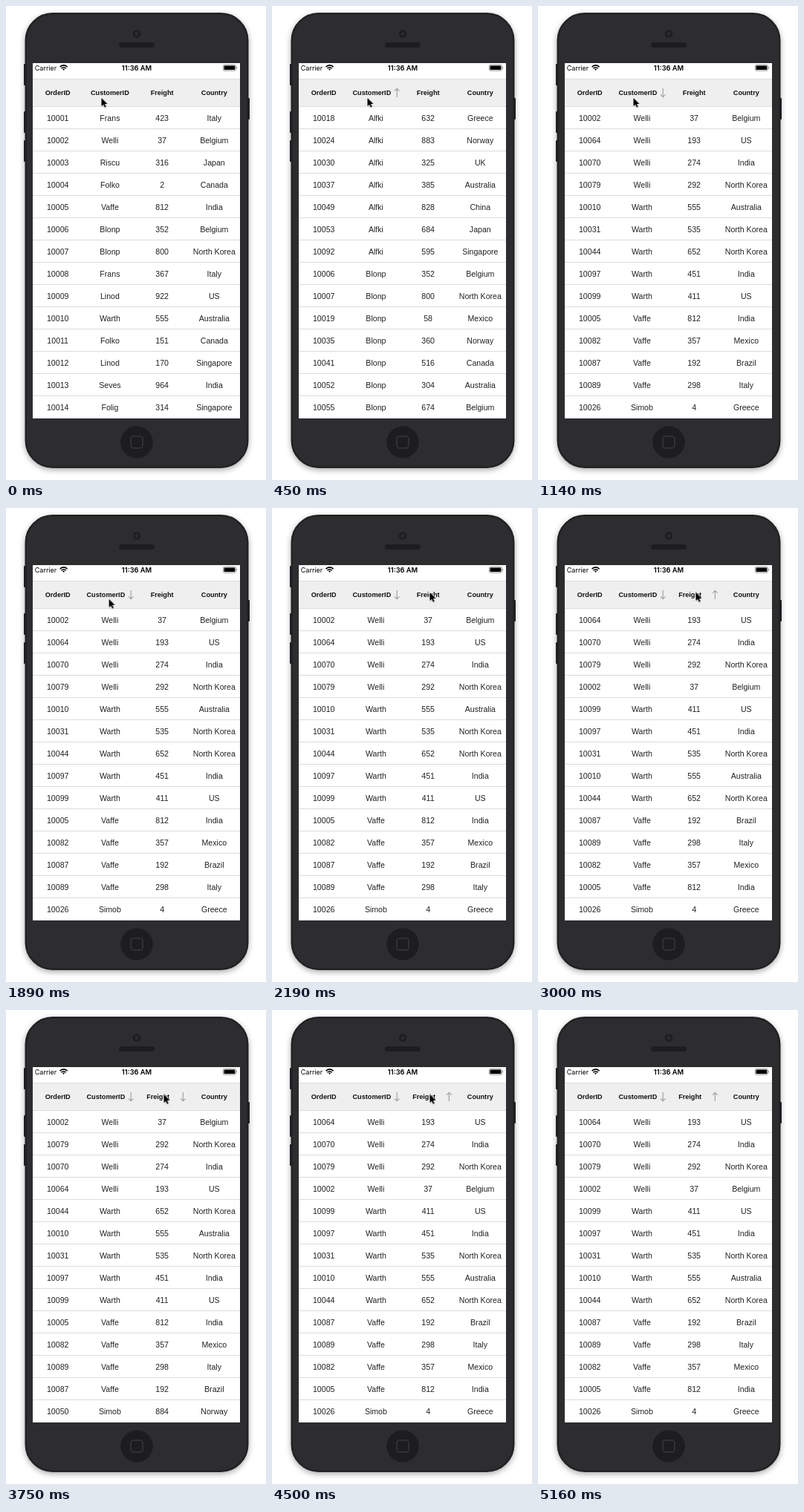
Animation, 350 px wide and 639 px high, one loop 5.46 s. Source, as an HTML page:

```html
<!DOCTYPE html>
<html lang="en">
<head>
<meta charset="utf-8">
<title>Sortable grid on a phone</title>
<style>
  html, body { margin: 0; width: 100%; height: 100%; overflow: hidden; background: #fff; }
  svg { position: absolute; left: 0; top: 0; display: block; }
  text { font-family: "Liberation Sans", Arial, sans-serif; text-anchor: middle; }
  .cell { font-size: 10.6px; fill: #222; }
  .head { font-size: 9.15px; font-weight: 700; fill: #111; }
  .status { font-family: Inter, Roboto, sans-serif; font-size: 9px; fill: #000; }
  .time { font-size: 9.3px; font-weight: 600; }
  .rule { stroke: #dcdcdc; stroke-width: 1; }
  .arrow { fill: none; stroke: #a2a2a2; stroke-width: 1.2; }

  #strip { animation: sort 5460ms step-end infinite; }
  #cursor { animation: point 5460ms step-end infinite; }

  /* The views lie side by side, 300px apart. */
  @keyframes sort {
    0%      { transform: translateX(0); }
    8.241%  { transform: translateX(-300px); }
    20.879% { transform: translateX(-600px); }
    54.945% { transform: translateX(-900px); }
    68.681% { transform: translateX(-1200px); }
    82.417%, 100% { transform: translateX(-900px); }
  }
  @keyframes point {
    0%      { transform: translate(128.5px, 124px); }
    33.516% { transform: translate(128.5px, 124px); animation-timing-function: steps(3, jump-start); }
    35.3%   { transform: translate(143.6px, 122.2px); animation-timing-function: steps(6, jump-start); }
    38.9%   { transform: translate(197.4px, 115.8px); animation-timing-function: steps(3, jump-start); }
    40.7%   { transform: translate(212.5px, 114px); }
    90.109% { transform: translate(210.5px, 114.5px); }
    92.857% { transform: translate(210.5px, 114.5px); visibility: visible; animation-timing-function: steps(3, jump-start); }
    94.505%, 100% { transform: translate(301px, 86.5px); visibility: hidden; }
  }
</style>
</head>
<body>
<svg width="350" height="639" viewBox="0 0 350 639">
  <defs>
    <clipPath id="screen"><rect x="36" y="77" width="279" height="479"/></clipPath>
    <filter id="soft" x="-10%" y="-10%" width="120%" height="120%"><feGaussianBlur stdDeviation="4"/></filter>
    <filter id="faint" x="-50%" y="-50%" width="200%" height="200%"><feGaussianBlur stdDeviation=".8"/></filter>
  </defs>

  <rect x="26" y="12" width="300" height="613" rx="37" fill="#000" opacity=".38" filter="url(#soft)"/>
  <g fill="#1d1d20">
    <rect x="24" y="78" width="4" height="29" rx="1"/>
    <rect x="24" y="142" width="4" height="29" rx="1"/>
    <rect x="24" y="181" width="4" height="29" rx="1"/>
    <rect x="324" y="124" width="4" height="29" rx="1"/>
  </g>
  <rect x="26.75" y="10.25" width="298.5" height="611.5" rx="36" fill="#2d2d30" stroke="#222225" stroke-width="2.5"/>
  <circle cx="176" cy="37.5" r="5.2" fill="#1d1d20"/>
  <circle cx="176" cy="37.5" r="2.7" fill="#2a2a2d"/>
  <rect x="152" y="49" width="48" height="7" rx="3.5" fill="#1d1d20"/>
  <circle cx="176" cy="588" r="21.7" fill="#1d1d20"/>
  <rect x="168" y="580" width="16" height="16" rx="4" fill="none" stroke="#37373a" stroke-width="1.6"/>

  <g clip-path="url(#screen)">
    <rect x="36" y="77" width="279" height="479" fill="#fff"/>
    <rect x="36" y="98" width="279" height="38" fill="#efefef"/>
    <path class="rule" d="M36 98.5H315M36 135.5H315"/>
    <g id="rules"></g>
    <g id="strip"></g>
  </g>

  <text class="status" x="53.5" y="86.5">Carrier</text>
  <text class="status time" x="176" y="86.5">11:36 AM</text>
  <g fill="none" stroke="#000" stroke-width="1.6">
    <path d="M72.6 82.1Q77.6 77.7 82.6 82.1M74.5 84.1Q77.6 81.4 80.7 84.1"/>
    <path d="M76 85.1Q77.6 83.9 79.2 85.1L77.6 87z" fill="#000" stroke="none"/>
  </g>
  <rect x="292.4" y="79.4" width="17" height="7.8" rx="1.8" fill="none" stroke="#777" stroke-width=".8"/>
  <rect x="293.5" y="80.5" width="14.8" height="5.6" rx=".9"/>
  <path d="M310.3 82v2.6q1-.3 1-1.3t-1-1.3z" fill="#777"/>

  <g id="cursor">
    <path d="M0 0V11.2L2.6 8.8 4.3 12.8 6.2 12 4.5 8.1H8z" transform="translate(.3 1)" opacity=".35" filter="url(#faint)"/>
    <path d="M0 0V11.2L2.6 8.8 4.3 12.8 6.2 12 4.5 8.1H8z" stroke="#fff" stroke-width="1.3" paint-order="stroke"/>
  </g>
</svg>

<script>
  const orders = `10001 Frans 423 Italy
10002 Welli 37 Belgium
10003 Riscu 316 Japan
10004 Folko 2 Canada
10005 Vaffe 812 India
10006 Blonp 352 Belgium
10007 Blonp 800 North Korea
10008 Frans 367 Italy
10009 Linod 922 US
10010 Warth 555 Australia
10011 Folko 151 Canada
10012 Linod 170 Singapore
10013 Seves 964 India
10014 Folig 314 Singapore
10018 Alfki 632 Greece
10019 Blonp 58 Mexico
10024 Alfki 883 Norway
10026 Simob 4 Greece
10030 Alfki 325 UK
10031 Warth 535 North Korea
10035 Blonp 360 Norway
10037 Alfki 385 Australia
10041 Blonp 516 Canada
10044 Warth 652 North Korea
10049 Alfki 828 China
10050 Simob 884 Norway
10052 Blonp 304 Australia
10053 Alfki 684 Japan
10055 Blonp 674 Belgium
10064 Welli 193 US
10070 Welli 274 India
10079 Welli 292 North Korea
10082 Vaffe 357 Mexico
10087 Vaffe 192 Brazil
10089 Vaffe 298 Italy
10092 Alfki 595 Singapore
10097 Warth 451 India
10099 Warth 411 US`.split("\n").map(line => {
    const [id, customer, freight, ...country] = line.split(" ");
    return [id, customer, freight, country.join(" ")];
  });

  const titles = ["OrderID", "CustomerID", "Freight", "Country"];
  const rowCount = 14, rowHeight = 30, viewGap = 300;
  const colX = col => 69.7 + 70.2 * col;

  // Direction of the CustomerID and Freight sorts: 1 up, -1 down, 0 none.
  const views = [[0, 0], [1, 0], [-1, 0], [-1, 1], [-1, -1]];

  const label = (cls, x, y, text) => `<text class="${cls}" x="${x}" y="${y}">${text}</text>`;

  // All columns, freight included, compare as text.
  const compare = (a, b) => (a > b) - (a < b);

  function sorted([byCustomer, byFreight]) {
    return [...orders].sort((a, b) =>
      byCustomer * compare(a[1], b[1]) ||
      byFreight * compare(a[2], b[2]) ||
      compare(a[0], b[0]));
  }

  function arrow(x, dir) {
    return `<path class="arrow" transform="translate(${x} 117) scale(1 ${dir})" d="M0 6V-5.6M-3.3 -2.3L0 -5.6 3.3 -2.3"/>`;
  }

  function header(col, dir) {
    const x = colX(col);
    return label("head", dir ? x - 5.5 : x, 120.2, titles[col]) +
      (dir ? arrow(x + 28.3, dir) : "");
  }

  function view(dirs, index) {
    const heads = titles.map((_, col) => header(col, [0, ...dirs, 0][col])).join("");
    const rows = sorted(dirs).slice(0, rowCount).map((order, row) =>
      order.map((value, col) => label("cell", colX(col), 154.8 + rowHeight * row, value)).join("")
    ).join("");
    return `<g transform="translate(${viewGap * index} 0)">${heads}${rows}</g>`;
  }

  document.getElementById("strip").innerHTML = views.map(view).join("");
  document.getElementById("rules").innerHTML = Array.from({ length: rowCount - 1 }, (_, row) =>
    `<path class="rule" d="M36 ${165.5 + rowHeight * row}H315"/>`).join("");
</script>
</body>
</html>
```
